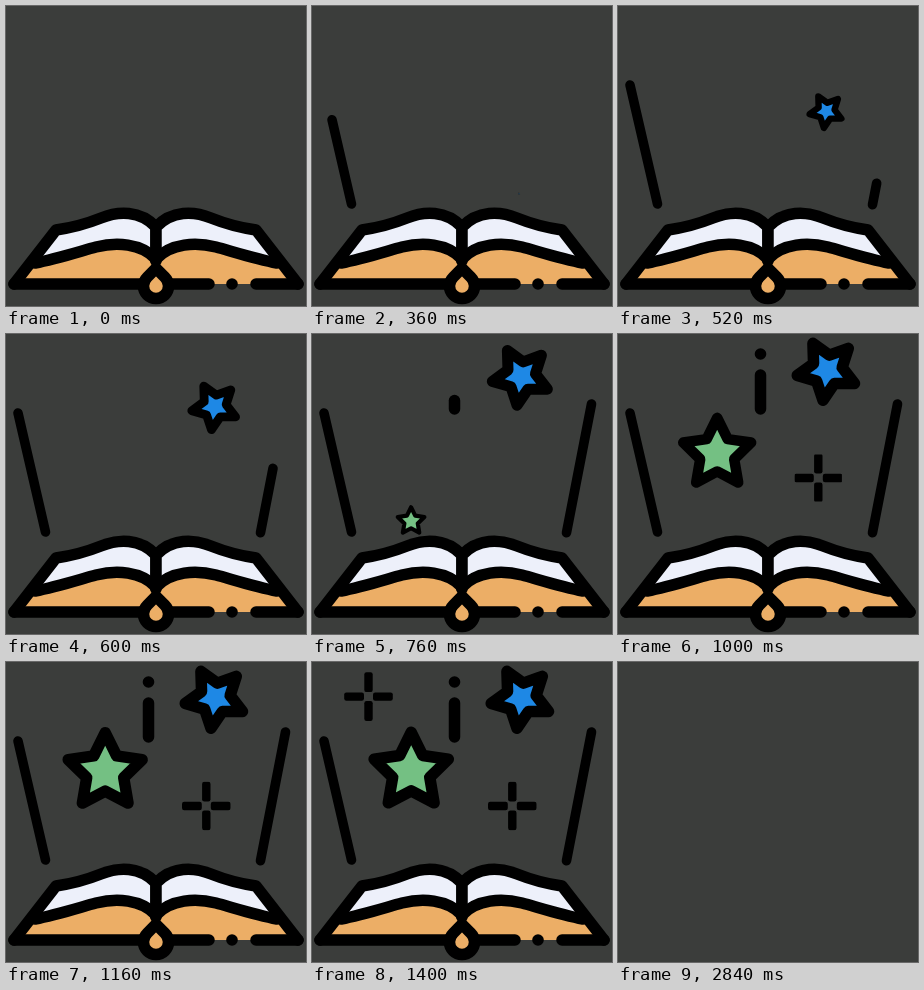
Write an HTML page that moves like this. It is 300 by 300 pixels and loops after 2960 ms.

```html
<!DOCTYPE html>
<html lang="en">
<head>
<meta charset="utf-8">
<title>Magic book</title>
<style>
  html, body { margin: 0; width: 100%; height: 100%; overflow: hidden; background: #3b3d3b; }
  svg { display: block; width: 100vw; height: 100vh; }
  .ink { stroke: #000; stroke-width: 11.5; stroke-linecap: round; stroke-linejoin: round; }
</style>
</head>
<body>
<svg viewBox="0 0 300 300">
  <defs>
    <clipPath id="clipR"><rect/></clipPath>
    <clipPath id="clipL"><rect/></clipPath>
    <g id="plus">
      <rect x="-24.3" y="-4.2" width="19.8" height="8.4" rx="2.2"/>
      <rect x="4.5" y="-4.2" width="19.8" height="8.4" rx="2.2"/>
      <rect x="-4.2" y="-24.3" width="8.4" height="19.8" rx="2.2"/>
      <rect x="-4.2" y="4.5" width="8.4" height="19.8" rx="2.2"/>
    </g>
    <g id="half">
      <path fill="#ecae66" d="M8 278L31 256C50 253 75 245 90 241C110 236 135 237 150 253V278Z"/>
      <path fill="#edf0fa" d="M50 224C64 222 80 218 95 212C112 205 134 204 150 221V253C135 237 110 236 90 241C75 245 50 253 31 256Z"/>
      <path class="ink" fill="none" d="M8 278L50 224C64 222 80 218 95 212C112 205 134 204 150 221V255"/>
      <path class="ink" fill="none" d="M29 257C50 253 75 245 90 241C110 236 135 237 150 253"/>
    </g>
  </defs>
  <g id="scene">
    <path id="blue" class="ink" fill="#1e88e5"/>
    <path id="green" class="ink" fill="#74c083"/>
    <line id="rayL" class="ink" style="stroke-width:9.6"/>
    <line id="rayR" class="ink" style="stroke-width:9.6"/>
    <line id="bar" class="ink"/>
    <circle id="dot" cx="142.5" cy="20"/>
    <g transform="translate(200.3 144)"><use href="#plus" clip-path="url(#clipR)"/></g>
    <g transform="translate(56.5 34.6)"><use href="#plus" clip-path="url(#clipL)"/></g>
    <g>
      <use href="#half"/>
      <use href="#half" transform="translate(300 0) scale(-1 1)"/>
      <path class="ink" d="M8 278H139M161 278H203M250 278H292"/>
      <circle cx="226" cy="278" r="5.8"/>
      <path class="ink" fill="#ecae66" d="M150 262.3L141.2 271.2A12.5 12.5 0 1 0 158.8 271.2Z"/>
    </g>
  </g>
</svg>
<script>
const LOOP = 2960, STEP = 40, HIDE_AT = 2840;
const $ = id => document.getElementById(id);
const mix = (a, b, p) => a + (b - a) * p;
const ramp = (t, start, dur) => Math.min(1, Math.max(0, (t - start) / dur));

// cubic-bezier(.25, .1, .25, 1)
function ease(x) {
  let lo = 0, hi = 1;
  for (let i = 0; i < 24; i++) {
    const u = (lo + hi) / 2, v = 1 - u;
    if (0.75 * u * v * v + 0.75 * u * u * v + u * u * u < x) lo = u; else hi = u;
  }
  const v = 1 - lo;
  return x >= 1 ? 1 : 0.3 * lo * v * v + 3 * lo * lo * v + lo * lo * lo;
}

function set(el, attrs) {
  for (const k in attrs) el.setAttribute(k, attrs[k]);
}

function show(el, on) {
  el.style.visibility = on ? "visible" : "hidden";
}

function starPath(r, turn) {
  let d = "";
  for (let i = 0; i < 10; i++) {
    const a = (turn - 90 + i * 36) * Math.PI / 180, q = i % 2 ? r * 0.5 : r;
    d += (i ? "L" : "M") + (q * Math.cos(a)).toFixed(2) + " " + (q * Math.sin(a)).toFixed(2);
  }
  return d + "Z";
}

function star(id, p, x0, y0, x1, y1) {
  const el = $(id);
  show(el, p > 0);
  set(el, { transform: `translate(${mix(x0, x1, p)} ${mix(y0, y1, p)}) scale(${p})` });
}

function line(id, p, x1, y1, x2, y2) {
  const el = $(id);
  show(el, p > 0);
  set(el, { x1, y1, x2: mix(x1, x2, p), y2: mix(y1, y2, p) });
}

function reveal(id, p) {
  const h = 24.5 * p;
  set($(id).firstElementChild, { x: -h, y: -h, width: 2 * h, height: 2 * h });
}

function draw(t) {
  $("scene").style.display = t < HIDE_AT ? "" : "none";
  line("rayL", ramp(t, 190, 240), 39.5, 198, 12, 79);
  line("rayR", ramp(t, 480, 240), 254.5, 198.7, 279.5, 70);
  line("bar", ramp(t, 720, 160), 142.5, 75, 142.5, 41);
  star("blue", ease(ramp(t, 340, 560)), 207, 191, 209.2, 36.2);
  star("green", ease(ramp(t, 630, 570)), 99, 231, 99.2, 109.3);
  set($("dot"), { r: 5.8 * ramp(t, 850, 120) });
  reveal("clipR", ramp(t, 843, 163));
  reveal("clipL", ramp(t, 1240, 160));
}

set($("blue"), { d: starPath(30.4, -28) });
set($("green"), { d: starPath(39, 0) });

const begin = performance.now();
function tick() {
  const t = (performance.now() - begin) % LOOP;
  draw(Math.floor(t / STEP) * STEP);
  requestAnimationFrame(tick);
}
tick();
</script>
</body>
</html>
```
